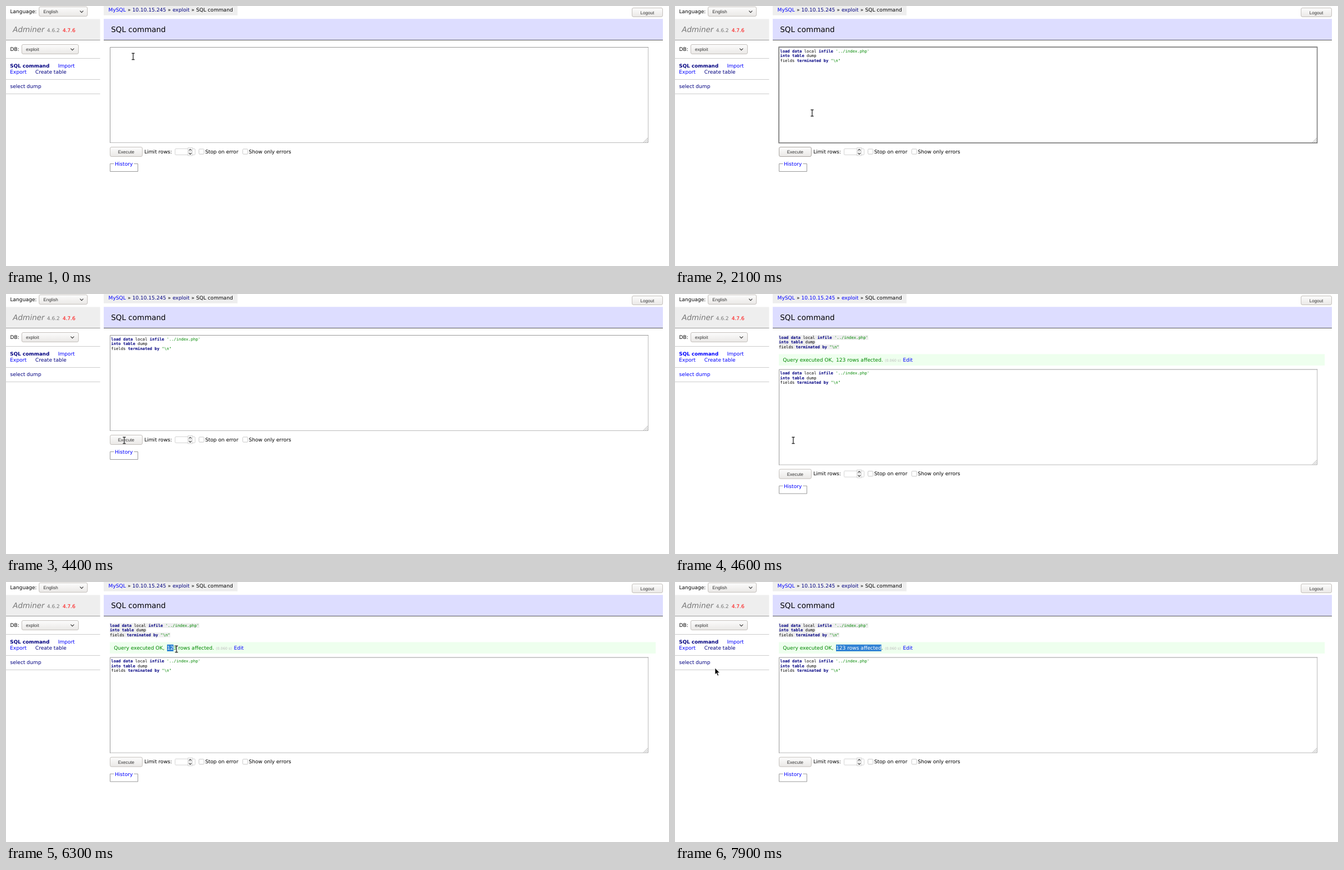
An HTML page for the animation above (8 s loop, 1194 px wide and 469 px high).

```html
<!DOCTYPE html>
<html lang="en">
<head>
<meta charset="utf-8">
<title>SQL command</title>
<style>
html, body { margin: 0; width: 100%; height: 100%; overflow: hidden; background: #fff }
svg { display: block; font: 9.08px "DejaVu Sans", sans-serif; text-rendering: geometricPrecision }
text { white-space: pre }
.ui { font: 8.1px "Liberation Sans", sans-serif; fill: #333 }
.mid { text-anchor: middle }
.link { fill: #00f }
.seen { fill: #000080 }
.fresh .seen { fill: #00f }
.line { fill: none; stroke: #999 }
.rule { stroke: #ccc }
.btn { fill: url(#face); stroke: #c4c0bc }
.box { fill: #fff; stroke: #c8c8c8 }
.chev { fill: none; stroke: #333; stroke-width: 1.1 }
#code { font: 7.237px "DejaVu Sans Mono", monospace }
#code .k { font-weight: bold; fill: #000080 }
#code .s { fill: #080 }
.plain #code tspan { font-weight: normal; fill: #000 }
</style>
</head>
<body>
<svg id="stage" width="1194" height="469" viewBox="0 0 1194 469">
<defs>
  <linearGradient id="face" x2="0" y2="1"><stop stop-color="#fcfcfc"/><stop offset="1" stop-color="#eae8e6"/></linearGradient>
  <g id="code">
    <text><tspan class="k">load data</tspan> local <tspan class="k">infile</tspan> <tspan class="s">'../index.php'</tspan></text>
    <text y="8.4"><tspan class="k">into table</tspan> dump</text>
    <text y="16.8">fields <tspan class="k">terminated by</tspan> <tspan class="s">"\n"</tspan></text>
  </g>
</defs>

<!-- sidebar -->
<text x="7.5" y="13.2">Language:</text>
<rect class="btn" x="59.5" y="1.5" width="87" height="17" rx="2.5"/>
<text class="ui" x="67.3" y="13">English</text>
<path class="chev" d="M133.2 8.6l3 3 3-3"/>
<path fill="#eee" d="M0 23.5h169.5v38H0z"/>
<path class="line" d="M0 61.5h169.5"/>
<text x="12.2" y="47.3" font-size="13.5" font-style="italic" fill="#777">Adminer</text>
<text x="73.8" y="47.3" fill="#777">4.6.2</text>
<text x="101.9" y="47.3" fill="#f00">4.7.6</text>
<text x="7.5" y="81.2">DB:</text>
<rect class="btn" x="28.5" y="69.5" width="102" height="17" rx="2.5"/>
<text class="ui" x="36" y="81">exploit</text>
<path class="chev" d="M116.5 76.6l3 3 3-3"/>
<path class="rule" d="M0 94.5h169.5M0 132.5h169.5M0 158.5h169.5"/>
<text class="seen" x="7.3" y="111" font-size="8.85" font-weight="bold">SQL command</text>
<text class="link" x="93.8" y="111">Import</text>
<text class="link" x="7.3" y="122.3">Export</text>
<text class="seen" x="52.8" y="122.3">Create table</text>
<text class="seen" x="7.5" y="148.3">select dump</text>

<!-- header -->
<path fill="#eee" d="M176 0h241v16.7H176z"/>
<text y="10.2"><tspan class="link" x="184.6">MySQL</tspan><tspan x="218.9">»</tspan><tspan class="seen" x="227.6">10.10.15.245</tspan><tspan x="291.2">»</tspan><tspan class="seen" x="299.9">exploit</tspan><tspan x="333.8">»</tspan><tspan x="342.5">SQL command</tspan></text>
<path fill="#ddf" d="M176 23.3h1007v38H176z"/>
<path stroke="#555" d="M176 61.5h1007"/>
<text x="189.3" y="47.3" font-size="13.5">SQL command</text>
<rect class="btn" x="1127.5" y="3.5" width="55" height="16" rx="2.5"/>
<text class="ui mid" x="1155" y="14.6">Logout</text>

<!-- query result -->
<g id="result">
  <path fill="#eee" d="M187 74.2h161.2v8.6h-95.8v8.4H296v8.6H187z"/>
  <use href="#code" x="187" y="81.1"/>
  <path fill="#efe" d="M187 108.5h983v20.5H187z"/>
  <rect id="mark" x="290" y="112.8" height="12.2" fill="#3082d4"/>
  <text y="122.2" fill="#080"><tspan x="194.2">Query executed OK,</tspan><tspan id="picked" x="290" fill="#fff"></tspan><tspan id="rest"></tspan></text>
  <text x="378" y="122.4" font-size="6.4" fill="#bbb">(0.060 s)</text>
  <text class="link" x="410.5" y="122.2">Edit</text>
</g>

<!-- form -->
<g id="form">
  <path stroke="#bbb" fill="none" d="M187 246.5h969.5V74"/>
  <path class="line" d="M187.5 247V74.5H1157"/>
  <rect id="focus" class="line" x="187" y="74" width="969.5" height="173" stroke-width="1.5" style="stroke:#777"/>
  <path class="line" stroke-width=".8" d="M1148 246l8-8M1151 246l5-5M1154 246l2-2"/>
  <g id="query">
    <use href="#code" x="189.3" y="83.8"/>
    <path id="caret" stroke="#080" stroke-width=".8" d="M298.9 94v8"/>
  </g>
  <rect id="run" class="btn" x="187.5" y="254.5" width="58" height="17" rx="2.5"/>
  <text id="runText" class="ui mid" x="216.3" y="266.3">Execute</text>
  <text x="249.2" y="265.6">Limit rows:</text>
  <rect class="box" x="304.5" y="257.5" width="36" height="11" rx="1.5" style="stroke:#d4d4d4"/>
  <path fill="#f4f4f4" stroke="#ccc" stroke-width=".7" d="M327.5 255.5h8.5v14.5h-8.5zM327.5 262.7h8.5"/>
  <path class="chev" d="M329.4 260.6l2.4-2.2 2.4 2.2M329.4 265.2l2.4 2.2 2.4-2.2"/>
  <rect class="box" x="347.5" y="258" width="9.2" height="9.2" rx="1.5"/>
  <text x="358.7" y="265.6">Stop on error</text>
  <rect class="box" x="426.3" y="258" width="9.2" height="9.2" rx="1.5"/>
  <text x="437.3" y="265.6">Show only errors</text>
  <path class="line" d="M194.5 284.5h-7v14h50v-14h-7"/>
  <text class="link" x="196" y="288">History</text>
</g>
<g id="tip">
  <rect x="214" y="277.5" width="47.5" height="22" rx="3" fill="#333"/>
  <text class="ui mid" x="237.8" y="291.4" style="fill:#fff">Ctrl+Enter</text>
</g>

<!-- pointer -->
<g id="pointer">
  <g id="beam" fill="none">
    <path stroke="#ddd" stroke-width="2.4" d="M-2.5-5.6h5M0-5.6v11.2M-2.5 5.6h5"/>
    <path stroke="#222" stroke-width="1.1" d="M-2.5-5.6h5M0-5.6v11.2M-2.5 5.6h5"/>
  </g>
  <path id="arrow" stroke="#fff" stroke-width=".8" d="M0 0v12l2.7-2.5 2 4.7 2-.9-2-4.5h3.8z"/>
</g>
</svg>
<script>
const $ = id => document.getElementById(id);
const show = (id, on) => $(id).setAttribute("display", on ? "inline" : "none");
const LOOP = 8000, STEP = 100, COUNT = "123 rows affected";
// pointer stops: time, x, y
const stops = [
  [0, 229, 91], [1400, 229, 91], [2100, 247, 193], [2600, 247, 193], [2900, 218, 276],
  [3000, 215, 263], [4300, 215, 263], [4400, 213, 264], [4800, 213, 264], [5400, 300.5, 123],
  [5700, 290.5, 120], [6200, 290.5, 120], [6300, 307, 121], [7100, 372, 121],
  [7500, 372, 121], [7700, 190, 168], [7900, 72, 155], [LOOP, 72, 155]
];

function pointerAt(t) {
  const i = stops.findIndex(s => s[0] > t);
  const [t0, x0, y0] = stops[i - 1], [t1, x1, y1] = stops[i];
  const p = (t - t0) / (t1 - t0), e = p * p * (3 - 2 * p);
  return [x0 + (x1 - x0) * e, y0 + (y1 - y0) * e];
}

function draw(now) {
  const t = Math.floor(now % LOOP / STEP) * STEP;
  const within = (a, b) => t >= a && t < b;
  const done = t >= 4600, focused = within(300, 3800), pressed = within(3800, 4000);

  $("stage").setAttribute("class", t < 1200 ? "plain" : within(4600, 4700) ? "fresh" : "");
  show("result", done);
  $("form").setAttribute("transform", `translate(0 ${done ? 61.6 : 0})`);
  show("query", t >= 300);
  show("focus", focused);
  show("caret", focused && !within(1500, 2700));
  $("run").style.fill = pressed ? "#d6d1cd" : "";
  $("run").style.stroke = focused || pressed ? "#a8a4a0" : "";
  $("runText").setAttribute("x", pressed ? 217 : 216.3);
  show("tip", pressed);
  $("tip").setAttribute("opacity", t < 3900 ? 0.5 : 0.2);

  const [x, y] = pointerAt(t);
  const arrow = t < 4400 ? y > 247 : x < 187;
  $("pointer").setAttribute("transform", `translate(${x} ${y})`);
  show("arrow", arrow);
  show("beam", !arrow);

  const n = t < 6300 ? 0 : Math.min(COUNT.length, Math.round(2 + (t - 6300) / 800 * 15));
  $("picked").textContent = COUNT.slice(0, n);
  $("rest").textContent = COUNT.slice(n) + ".";
  if (n) $("rest").removeAttribute("x"); else $("rest").setAttribute("x", 290);
  $("mark").setAttribute("width", n && done ? $("picked").getComputedTextLength() : 0);
}

function tick(now) {
  draw(now);
  requestAnimationFrame(tick);
}
tick(performance.now());
</script>
</body>
</html>
```
